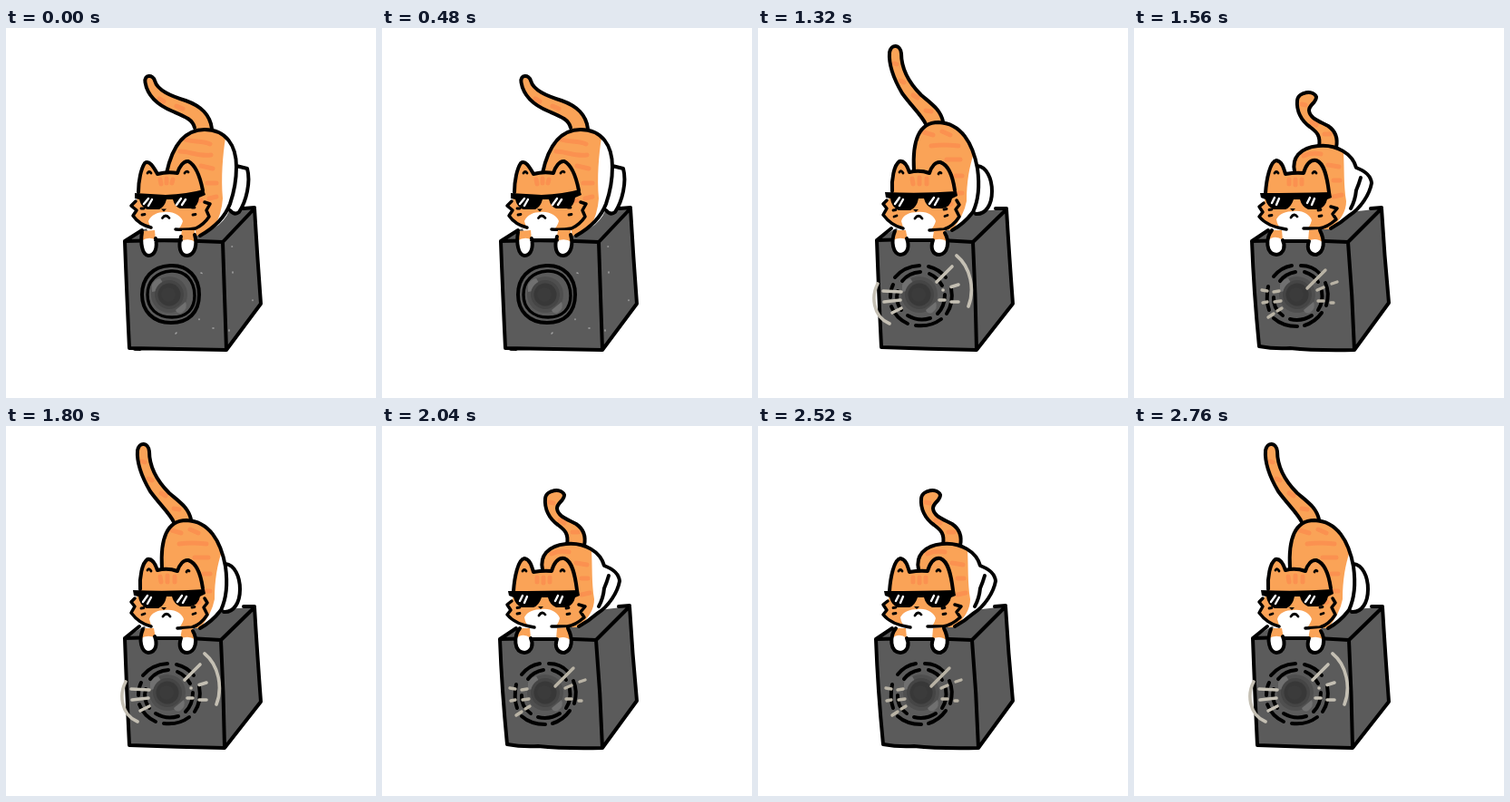
These frames come from a looping animation (408 px wide and 408 px high, 2880 ms). An HTML page:

```html
<!DOCTYPE html>
<html lang="en">
<head>
<meta charset="utf-8">
<title>Cat on a speaker</title>
<style>
html, body { margin: 0; width: 100%; height: 100%; overflow: hidden; background: #fff; }
svg { display: block; width: 100%; height: 100%; }
path, circle { fill: none; stroke-linecap: round; stroke-linejoin: round; }
.ink { stroke: #000; stroke-width: 4; }
.thin { stroke: #000; stroke-width: 2.8; }
.o { fill: #faa357; }
.w { fill: #fff; }
.k { fill: #000; }
.g { fill: #5b5b5b; }
.stripe { stroke: #fb9150; stroke-width: 5; }
.glint { stroke: #fff; stroke-width: 2.4; }
.beam { stroke: #b9b3a5; stroke-width: 3.4; }
.wave { stroke: #c4bfb3; stroke-width: 3.6; }
.speck { stroke: #a5a5a5; stroke-width: 1.5; }
.pose { display: none; }
</style>
</head>
<body>
<svg viewBox="0 0 408 408">
<defs>
  <g id="cone">
    <circle cx="180" cy="294" r="20" style="fill:#4f4f4f"/>
    <path d="M161 283Q164 277 170 276L173 281Q168 284 167 290L161 291Z" style="fill:#707070"/>
    <path d="M187 311L198 302Q201 309 194 314Q189 316 187 311Z" style="fill:#707070"/>
    <circle cx="180" cy="294" r="16" style="fill:#454545"/>
    <circle cx="180" cy="294" r="12.5" style="fill:#383838"/>
    <circle cx="179" cy="294" r="8" style="fill:#3b3b3b"/>
  </g>
</defs>

<!-- middle -->
<g id="mid" class="pose">
  <path class="g" d="M131 235L152 222L238 200L274 199L281 304L243 355L136 353Z"/>
  <path class="ink" d="M131 235Q185 233 239 236L274 199Q277 250 281 304L243 355Q190 354 136 353Q133 290 131 235L150 223M239 236Q241 295 243 355M262 199L274 198M142 354L148 354"/>
  <path class="speck" d="M163 241h.1M249 241h.5M215 270l1 .4M250 269v1M228 331h1M187 337l1-1M272 300v.5M213 321v.5M246 333v1"/>
  <use href="#cone"/>
  <path class="ink" d="M181 262C201 261 213 275 213 294C213 314 201 325 182 325C162 325 150 312 150 294C150 276 161 263 181 262Z"/>
  <path class="ink" style="stroke-width:3.4" d="M182 268C198 267 208 279 208 295C208 310 199 319 183 319C166 319 156 309 156 294C156 279 166 269 182 268Z"/>

  <path class="o" d="M208 112C206 101 198 98 184 92C167 85 156 75 153.500 60C152 51 162 51 164 58C167 69 182 75 198 80C215 86 225 95 227 113Z"/>
  <path class="stripe" d="M169 78L174 81M188 86L195 89"/>
  <path class="ink" d="M208 110C206 101 198 98 184 92C167 85 156 75 153.500 60C152 51 162 51 164 58C167 69 182 75 198 80C215 86 225 95 227 111"/>
  <path class="o" d="M177 160C183 132 196 112 219 112C243 112 254 130 254 153Q254 174 247 194Q239 215 214 229L178 226Z"/>
  <path class="w" d="M242 121C251 128 254 138 254 153L267 156C270 172 265 192 257 203Q251 207 247 200Q241 214 229 221Q238 205 239 188C237 165 239 140 242 121Z"/>
  <path class="stripe" d="M198 123C206 126 217 124 225 128M192 136C202 136 213 142 226 140M215 152L228 155M222 171L232 171M224 188L232 186"/>
  <path class="ink" d="M177 160C183 132 196 112 219 112C243 112 254 130 254 153Q254 174 247 194Q239 215 214 229M254 152L266 155C270 170 265 191 257 203Q252 207 247 201"/>

  <path class="w" d="M154 218H208L206 235H160Z"/>
  <path class="o" d="M146 182C146 168 149 155 153 149C158 145 163 154 167 161Q178 158 189 160C191 153 196 146 201 147C209 151 214 164 217 179L218 192L225 194L221 201L224 208Q217 218 207 222H160Q149 218 141 207L144 201L138 196L144 191Z"/>
  <path class="w" d="M157 213C160 206 167 203 175 203C184 202 193 207 195 213Q193 220 188 224H162Q158 219 157 213Z"/>
  <path class="stripe" d="M170 167L171 172M177 166V171M184 167L183 171M212 191L215 190"/>
  <path class="ink" d="M146 181C146 168 149 155 153 149C158 145 163 154 167 161Q178 158 189 160C191 153 196 146 201 147C209 151 214 164 217 179"/>
  <path class="ink" style="stroke-width:3.500" d="M219 192L225 194L221 201L224 208Q218 217 209 221Q198 223 187 222M143 191L138 196L144 201L140 207Q147 217 160 220"/>
  <path class="thin" d="M156 160Q158 157 160 160M197 160Q199 157 201 159M172.500 209.500Q176 204.500 180 209.500"/>
  <path class="thin" d="M149 199H152M150 206L153 205.500M205 198H208M206 206L209 205.500"/>
  <path class="k" d="M142 182L176 184Q200 183 218 178L220 184L213 187Q212 196 205 199H192Q186 197 184 189H177Q175 197 169 200H156Q149 198 147 189L142 188Z"/>
  <path class="glint" d="M152 194L157 188M157 196L161 189M188 195L193 188M194 195L198 189"/>
  <path class="k" d="M171 199.500H177L174 202.500Z"/>
  <path class="w" d="M150 224C148 237 150 250 157 251C165 251 167 240 166 229ZM193 229C190 240 191 251 200 251C209 250 211 238 209 223Z"/>
  <path class="o" d="M150 224L149 235Q158 229 165 234L164 223ZM194 223L192 235Q202 231 209 236L208 223Z"/>
  <path class="ink" d="M150 225C148 237 150 250 157 251C165 251 167 241 165 232M193 230C190 240 191 251 200 251C209 250 211 238 208 228M165 234H193"/>
</g>

<!-- low -->
<g id="low" class="pose">
  <path class="g" d="M130 235L152 222L238 203L273 199L281 303L243 355L138 352Z"/>
  <path class="ink" d="M130 235Q185 233 236 236L273 199Q276 250 281 303L243 355Q200 356 172 353Q154 354 138 351Q132 290 130 235L148 223M236 236Q241 295 243 355M261 199L273 198"/>
  <use href="#cone"/>
  <path class="ink" d="M154 274Q162 264 174 262M184 262Q197 262 205 271M211 281Q216 292 212 306M207 314Q200 324 188 328M180 329Q164 329 154 320M149 311Q145 300 148 285M161 279Q167 271 178 269M188 269Q198 272 203 280M207 290Q209 302 203 311M196 317Q185 324 172 321M164 317Q153 309 154 297"/>
  <path class="beam" d="M191 287L211 267M202 289L209 286M218 282L224 280M203 301L209 301M217 303H220M141 289L147 290M154 291L160 290M142 303L147 302M155 302L162 301M148 319L154 315M158 312L163 309"/>

  <path class="o" d="M204 132C206 119 202 115 194 109C184 102 179 91 180 80C181 70 198 68 201 76C201 83 193 84 193 91C194 100 205 103 214 108C223 114 225 122 223 133Z"/>
  <path class="stripe" d="M185 84L189 85M196 104L201 107M210 117L216 117"/>
  <path class="ink" d="M204 131C206 119 202 115 194 109C184 102 179 91 180 80C181 70 198 68 201 76C201 83 193 84 193 91C194 100 205 103 214 108C223 114 225 122 223 132"/>
  <path class="o" d="M177 160C174 144 182 132 203 130C224 128 241 139 244 153L243 194Q233 212 215 222H178Z"/>
  <path class="w" d="M231 137Q242 143 244 153Q260 158 262 170C260 183 250 199 238 207Q228 215 217 221Q234 207 234 191C231 173 232 154 231 137Z"/>
  <path class="stripe" d="M187 141Q196 137 206 139M214 151L226 153M220 168L227 168M220 186L229 184"/>
  <path class="ink" d="M177 158C174 144 182 132 203 130C224 128 241 139 245 154Q261 160 262 171C260 183 250 199 237 207Q228 215 217 221M250 165Q248 172 245 179Q244 190 239 199"/>

  <path class="w" d="M152 218H207L205 235H156Z"/>
  <path class="o" d="M145 183C146 167 150 147 157 146C163 147 165 154 167 161Q178 159 187 160C190 150 195 145 201 146C210 149 213 165 215 182L218 195L224 199L219 206L223 211Q214 220 204 221H162Q149 220 138 209L142 203L138 195L144 191Z"/>
  <path class="w" d="M157 211C160 205 167 202 177 202C186 201 194 206 196 212Q194 220 188 224H165Q158 219 157 211Z"/>
  <path class="stripe" d="M171 167V172M178 167V173M185 167V172M205 194L207 196"/>
  <path class="ink" d="M145 182C146 167 150 147 157 146C163 147 165 154 167 161Q178 159 187 160C190 150 195 145 201 146C210 149 213 165 215 181"/>
  <path class="ink" style="stroke-width:3.500" d="M217 197L224 199L219 205L223 211Q213 220 204 221H187M143 193L138 197L142 203L138 208Q147 219 168 222"/>
  <path class="thin" d="M155 160Q157 157 159 160M197 160Q199 157 201 160M173 209Q176.500 203.500 180 208"/>
  <path class="thin" d="M149 200.500L152 200M149 207L152 206.500M203 201L206 200.500M204 207.500L207 207"/>
  <path class="k" d="M139 182Q180 182 217 181L218 187L213 189Q211 198 203 200H192Q185 197 183 189H176Q173 198 167 200H154Q147 197 145 189L140 187Z"/>
  <path class="glint" d="M152 193L155 187M157 195L160 188M191 193L194 187M196 195L199 188"/>
  <path class="k" d="M172 199H178L175 202Z"/>
  <path class="w" d="M152 222C145 232 145 249 157 250C166 249 167 240 164 229ZM193 229C190 241 193 250 201 250C210 247 211 235 205 222Z"/>
  <path class="o" d="M151 223L147 235Q155 227 164 234L163 223ZM193 223L192 235Q201 230 209 237L205 222Z"/>
  <path class="ink" d="M152 223C145 232 145 249 157 250C166 249 167 240 164 234M193 235C190 243 193 250 201 250C210 247 211 235 205 223M165 235H192"/>
</g>

<!-- high -->
<g id="high" class="pose">
  <path class="g" d="M131 234L152 221L238 202L274 200L281 304L241 355L136 352Z"/>
  <path class="ink" d="M131 234Q185 232 237 236L274 200Q277 250 281 304L241 355Q190 354 136 352Q133 290 131 234L147 221M237 236Q240 295 241 354M262 199L274 199"/>
  <use href="#cone" x="-2" y="0"/>
  <path class="ink" d="M151 275Q161 263 178 262M188 263Q200 266 207 275M213 287Q216 303 208 315M202 321Q190 330 174 328M165 326Q152 320 147 307M146 297Q146 289 149 283M159 279Q166 270 179 269M189 271Q198 275 203 284M206 294Q206 307 198 315M190 320Q177 324 165 317M158 311Q151 302 154 290"/>
  <path class="wave" d="M132 282C125 295 126 318 145 326M219 251C235 264 239 289 232 307"/>
  <path class="wave" d="M197 280L214 263M204 289H204.100M213 285.500L221 283M200 300L206 300M213 302H221M138 290L158 291M139 302L157 300M148 314L158 309"/>

  <path class="o" d="M185 108C181 97 170 87 159 72C149 55 144 41 145 27C147 17 157 18 158 28C158 45 166 60 180 74C193 85 201 90 204 105Z"/>
  <path class="stripe" d="M150 39L153 40M157 58L161 60M171 74L176 77M185 91L191 92"/>
  <path class="ink" d="M185 106C181 97 170 87 159 72C149 55 144 41 145 27C147 17 157 18 158 28C158 45 166 60 180 74C193 85 201 90 204 103"/>
  <path class="w ink" d="M242 152C252 153 258 166 258 180C258 195 251 206 240 205"/>
  <path class="o" d="M171 158C170 125 177 104 199 104C224 105 237 127 242 155Q246 184 237 203Q227 216 214 223H174Z"/>
  <path class="w" d="M238 138Q242 150 242 155Q246 184 237 203Q227 216 214 223Q227 207 230 191C230 170 233 153 238 138Z"/>
  <path class="stripe" d="M183 115L193 118M203 114L212 118M191 130Q204 128 221 130M208 145L223 145M218 163L225 163M219 182L225 182"/>
  <path class="ink" d="M172 157C170 125 177 104 199 104C224 105 237 127 242 155Q246 184 237 203Q227 216 214 223"/>

  <path class="w" d="M152 218H207L205 234H158Z"/>
  <path class="o" d="M148 181C147 167 150 151 156 147C161 146 165 153 167 159Q178 156 189 160C191 153 196 147 201 148C210 151 215 165 217 180L218 191L222 195L218 200L222 208Q215 219 205 222H160Q149 218 138 206L142 199L137 193L144 189Z"/>
  <path class="w" d="M158 213C160 206 167 203 176 203C187 202 194 207 196 213Q194 220 189 224H163Q159 219 158 213Z"/>
  <path class="stripe" d="M170 166L171 172M178 165V172M186 166V172M211 195L213 194"/>
  <path class="ink" d="M148 180C147 167 150 151 156 147C161 146 165 153 167 159Q178 156 189 160C191 153 196 147 201 148C210 151 215 165 217 179"/>
  <path class="ink" style="stroke-width:3.500" d="M219 190L222 195L218 200L222 208Q215 219 205 222L189 223M142 190L138 194L142 199L138 206Q147 218 160 221"/>
  <path class="thin" d="M156 159Q158 156 160 160M199 161Q200 158 202 160M173 210Q177 204.500 181 210"/>
  <path class="thin" d="M149 201L152 200.500M150 208L153 207M205 200L208 199.500M206 207.500L209 206.500"/>
  <path class="k" d="M140 181Q180 183 219 180L220 185L214 188Q212 198 203 199H192Q185 196 183 188H177Q175 198 168 201H155Q147 197 146 188L141 187Z"/>
  <path class="glint" d="M151 194L156 187M156 196L160 189M189 194L194 187M195 195L199 188"/>
  <path class="k" d="M171 200H177L174 203Z"/>
  <path class="w" d="M151 223C146 236 149 249 157 250C166 249 167 240 164 229ZM193 229C190 241 192 250 200 250C209 249 212 236 206 223Z"/>
  <path class="o" d="M151 223L148 235Q156 229 165 234L163 223ZM194 224L192 235Q201 230 209 236L206 223Z"/>
  <path class="ink" d="M151 224C146 236 149 249 157 250C166 249 167 240 164 232M193 234C190 242 192 250 200 250C209 249 212 236 206 226M165 234H193"/>
</g>
</svg>
<script>
const STEP = 120, LOOP = 2880;
const poses = ["mid", "low", "high"].map(id => document.getElementById(id));
const order = [0, 1, 0, 2];
const start = performance.now();

function draw(t) {
  const beat = Math.floor((t % LOOP) / STEP) % order.length;
  poses.forEach((pose, i) => {
    pose.style.display = i === order[beat] ? "inline" : "none";
  });
}

function tick(now) {
  draw(Math.max(0, now - start));
  requestAnimationFrame(tick);
}

draw(0);
requestAnimationFrame(tick);
</script>
</body>
</html>
```
